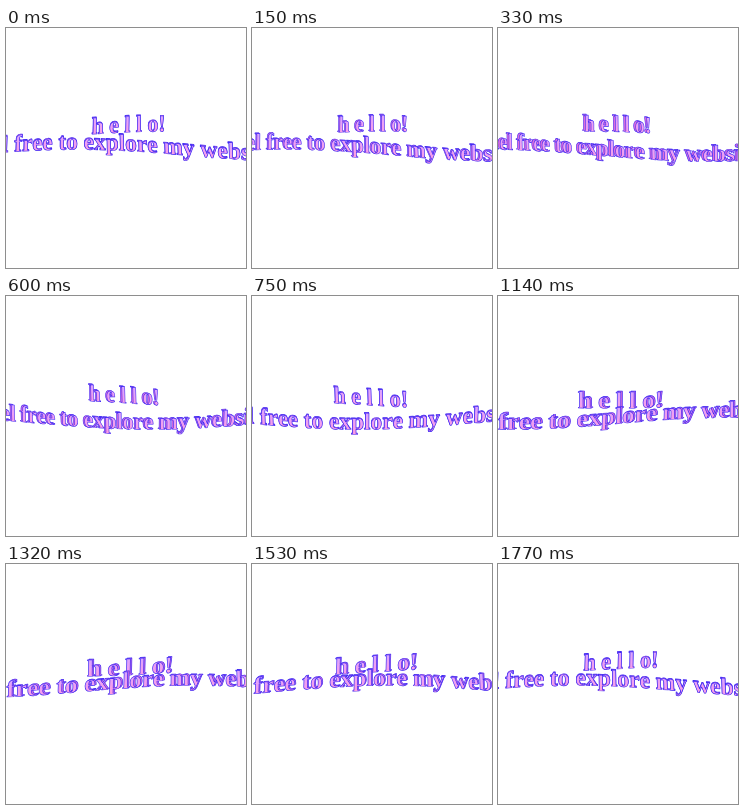
Animation, 240 px wide and 240 px high, one loop 1.8 s. Source, as an HTML page with a canvas:

```html
<!DOCTYPE html>
<html lang="en">
<head>
<meta charset="utf-8">
<title>Wavy greeting</title>
<style>
html, body { margin: 0; width: 100%; height: 100%; overflow: hidden; background: #fff; }
canvas { display: block; width: 240px; height: 240px; }
</style>
</head>
<body>
<canvas id="stage" width="240" height="240" role="img" aria-label="hello! feel free to explore my website"></canvas>
<script>
const ctx = document.getElementById('stage').getContext('2d');
const LOOP = 1800, STEP = 30, SIZE = 23.6;
const FONT = `bold ${SIZE}px "Liberation Serif", "Times New Roman", serif`;

// Cosine over the loop, peaking at `peak` ms; `n` cycles per loop.
const wave = (t, peak, n = 1) => Math.cos(2 * Math.PI * n * (t - peak) / LOOP);
const stretch = t => wave(t, 370) - 0.2 * wave(t, 0, 2);

const lines = [
  {
    text: 'h e l l o!', origin: () => 1.69 * SIZE, base: 107.9, height: 4.5,
    peak: x => 1230 - (x - 90) * 4.2,
    place: (u, t) => 121.3 + 3.2 * wave(t, 1450) + u * (0.96 - 0.115 * wave(t, 370))
  },
  {
    text: 'feel free to explore my website', origin: width => width('feel free to '),
    base: 127.5, height: 6,
    peak: x => 720 - (x - 115) * 4.1,
    place: (u, t) => 78 + 0.9 * wave(t, 280, 2) + u + stretch(t) * (0.00035 * u * u - 0.11 * u)
  }
];

ctx.font = FONT;
const width = s => ctx.measureText(s).width;
for (const line of lines) {
  const origin = line.origin(width);
  line.glyphs = [...line.text].map((char, i) => ({
    char,
    start: width(line.text.slice(0, i)) - origin,
    advance: width(char)
  })).filter(g => g.char !== ' ');
}

const face = ctx.createLinearGradient(0, -16, 0, 5);
face.addColorStop(0, '#d9a4ff');
face.addColorStop(0.5, '#f0a0f0');
face.addColorStop(1, '#ff9cdc');

function drawGlyph(line, glyph, t) {
  const x = line.place(glyph.start, t);
  const end = line.place(glyph.start + glyph.advance, t);
  const height = px => line.base + line.height * wave(t, line.peak(px));
  const y = height(x);
  const slope = (height(end) - y) / (end - x);
  const depth = -1.8 * stretch(t);

  function layer(fill, k) {
    ctx.setTransform((end - x) / glyph.advance, slope, slope * 0.4, 1,
      x + depth * (k - 0.4), y - 0.8 * k);
    ctx.fillStyle = fill;
    ctx.fillText(glyph.char, 0, 0);
    ctx.strokeText(glyph.char, 0, 0);
  }
  layer('#dc6cdc', 1);
  layer(face, 0);
}

function draw(now) {
  const t = Math.floor((now % LOOP) / STEP) * STEP;
  ctx.setTransform(1, 0, 0, 1, 0, 0);
  ctx.fillStyle = '#fff';
  ctx.fillRect(0, 0, 240, 240);
  ctx.font = FONT;
  ctx.lineWidth = 0.65;
  ctx.lineJoin = 'round';
  ctx.strokeStyle = '#3c28f4';
  for (const line of lines) {
    for (const glyph of line.glyphs) drawGlyph(line, glyph, t);
  }
}

const begin = performance.now();
function tick() {
  draw(performance.now() - begin);
  requestAnimationFrame(tick);
}
tick();
</script>
</body>
</html>
```
